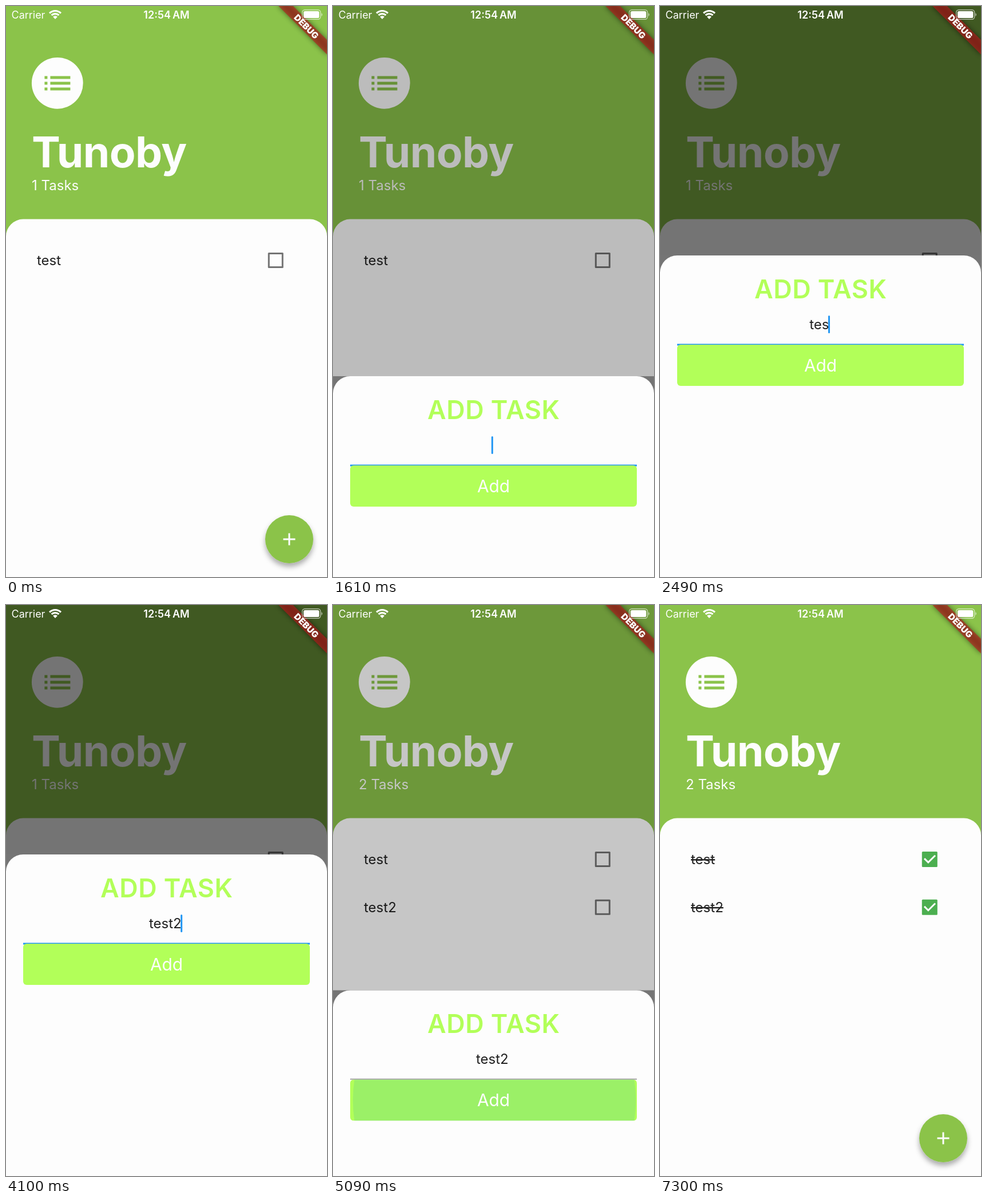
Recreate the animation shown at these times as an HTML page. Size 561 by 998 pixels, loop 7670 ms.

```html
<!DOCTYPE html>
<html lang="en">
<head>
<meta charset="utf-8">
<title>Task list</title>
<style>
  html, body { margin: 0; width: 100%; height: 100%; overflow: hidden; background: #8bc34a; }
  svg { display: block; width: 100vw; height: 100vh; }
  text { font-family: Inter, "Open Sans", sans-serif; font-size: 24px; white-space: pre; }
  .light { fill: #fdfdfd; }
  .dark { fill: #202020; }
  .mid { text-anchor: middle; }
</style>
</head>
<body>
<svg viewBox="0 0 561 998" preserveAspectRatio="none">
  <defs>
    <filter id="lift" x="-30%" y="-30%" width="160%" height="170%">
      <feDropShadow dx="0" dy="6" stdDeviation="5" flood-color="#000" flood-opacity=".33"/>
    </filter>
    <filter id="soft" x="-30%" y="-100%" width="160%" height="300%">
      <feGaussianBlur stdDeviation="5"/>
    </filter>
    <clipPath id="buttonShape"><rect x="30" y="156" width="501" height="72" rx="6"/></clipPath>
  </defs>

  <rect width="561" height="998" fill="#8bc34a"/>
  <circle cx="89.8" cy="134.8" r="44.9" class="light"/>
  <path fill="#8bc34a" d="M67.4 122.4h5v5h-5zm10 0h35v5h-35zM67.4 132.4h5v5h-5zm10 0h35v5h-35zM67.4 142.4h5v5h-5zm10 0h35v5h-35z"/>
  <text x="45" y="281.5" class="light" style="font-size:74.8px;font-weight:700;letter-spacing:-.6px">Tunoby</text>
  <text id="count" x="45" y="322" class="light"></text>

  <path class="light" d="M0 998V402.6a30 30 0 0 1 30-30H531a30 30 0 0 1 30 30V998z"/>
  <g id="rows"></g>
  <circle cx="495" cy="932" r="42" fill="#8bc34a" filter="url(#lift)"/>
  <path d="M484.5 932h21M495 921.5v21" stroke="#fdfdfd" stroke-width="3"/>

  <rect id="scrim" width="561" height="998"/>

  <g id="sheet">
    <rect width="561" height="562" fill="#757575"/>
    <path class="light" d="M0 562V30A30 30 0 0 1 30 0H531a30 30 0 0 1 30 30V562z"/>
    <text x="280.8" y="75" class="mid" fill="#b2ff59" style="font-size:44.9px;font-weight:600;letter-spacing:.5px">ADD TASK</text>
    <text id="entry" x="278.3" y="129" class="mid dark"></text>
    <rect id="caret" y="105" width="3" height="31" rx="1.5" fill="#2196f3"/>
    <rect id="underline" x="30" y="154.5" width="501"/>
    <g clip-path="url(#buttonShape)">
      <rect x="30" y="156" width="501" height="72" fill="#b2ff59"/>
      <circle id="splash" cx="282" cy="192" fill="#4ab89a"/>
    </g>
    <text x="280.5" y="203" class="mid light" style="font-size:29.9px">Add</text>
  </g>

  <g transform="translate(561 0) rotate(45)">
    <rect x="-60" y="41.9" width="120" height="18" opacity=".5" filter="url(#soft)"/>
    <rect x="-60" y="41.9" width="120" height="18" fill="#b71c1c" opacity=".63"/>
    <text y="56.4" class="mid" fill="#fff" style="font-size:15.3px;font-weight:900">DEBUG</text>
  </g>

  <g fill="#fff">
    <text x="9.5" y="22" style="font-size:18px">Carrier</text>
    <text x="280.5" y="22" class="mid" style="font-size:18px;font-weight:600;word-spacing:-1.5px">12:54 AM</text>
    <path d="M86 23l-4-4.2a5.8 5.8 0 0 1 8 0z"/>
    <path d="M79.6 16.2a9.1 9.1 0 0 1 12.8 0M76.1 12.6a14 14 0 0 1 19.8 0" fill="none" stroke="#fff" stroke-width="3.2"/>
    <rect x="517.7" y="6.7" width="32" height="16.6" rx="4.5" fill="none" stroke="#fff" stroke-width="1.4" opacity=".6"/>
    <rect x="520" y="9" width="27.4" height="12" rx="2.6"/>
    <path d="M551.3 12.3a3.2 3.2 0 0 1 0 5.6z" opacity=".6"/>
  </g>
</svg>

<script>
const LOOP = 7670;
const OPEN = 1540, SUBMIT = 4941, CLOSED = 5141;
const SHEET_TOP = 436, STAGE_HEIGHT = 998;
const KEYS = [[2210, "t"], [2350, "e"], [2430, "s"], [2510, "t"], [3740, "2"]];
const TASKS = [
  { name: "test", y: 444.5, checkedAt: 6060 },
  { name: "test2", y: 528.3, checkedAt: 6680 },
];

const el = id => document.getElementById(id);
const set = (node, attrs) => {
  for (const key in attrs) node.setAttribute(key, attrs[key]);
};
const progress = (t, start, length) => Math.min(1, Math.max(0, (t - start) / length));
const mix = (a, b, p) => a + (b - a) * p;

function bezier(x1, y1, x2, y2) {
  const at = (a, b, s) => 3 * a * s * (1 - s) ** 2 + 3 * b * s * s * (1 - s) + s ** 3;
  return x => {
    let low = 0, high = 1;
    for (let i = 0; i < 24; i++) {
      const s = (low + high) / 2;
      if (at(x1, x2, s) < x) low = s; else high = s;
    }
    return at(y1, y2, (low + high) / 2);
  };
}
const ease = bezier(.25, .1, .25, 1);
const easeOut = bezier(0, 0, .58, 1);
const easeIn = bezier(.42, 0, 1, 1);
const decelerate = bezier(0, 0, .2, 1);

for (const task of TASKS) {
  const row = document.createElementNS("http://www.w3.org/2000/svg", "g");
  row.innerHTML = `<text x="54" y="8.5" class="dark">${task.name}</text>
    <rect x="457.8" y="-13.5" width="27" height="27" rx="1.5"/>
    <rect class="light"/>
    <path d="M462 -1.4L468.8 5.4L481 -6.8" fill="none" stroke="#fdfdfd" stroke-width="3"
      pathLength="1" stroke-dasharray="1 2"/>`;
  set(row, { transform: `translate(0 ${task.y})` });
  el("rows").append(row);
  task.row = row;
  [task.label, task.box, task.hole, task.tick] = row.children;
}

function drawTask(task, t) {
  const p = easeIn(progress(t, task.checkedAt, 200));
  const fill = Math.min(1, p * 2), tick = Math.max(0, p * 2 - 1);
  const half = mix(10.5, 0, fill);
  const rgb = [[116, 76], [116, 175], [116, 80]].map(([a, b]) => Math.round(mix(a, b, fill)));
  task.label.style.textDecoration = t >= task.checkedAt ? "line-through" : "none";
  set(task.box, { fill: `rgb(${rgb})` });
  set(task.hole, { x: 471.3 - half, y: -half, width: half * 2, height: half * 2 });
  set(task.tick, { "stroke-dashoffset": 1 - tick, visibility: tick ? "visible" : "hidden" });
}

// The caret stays solid for 650 ms after a key, then fades out and in each second.
function caretOpacity(idle) {
  if (idle < 650) return 1;
  const phase = (idle - 650) % 1000;
  return phase < 500 ? 1 - easeOut(progress(phase, 0, 250)) : easeOut(progress(phase, 500, 250));
}

function drawSheet(t) {
  const shown = t < SUBMIT ? progress(t, OPEN, 250) : 1 - progress(t, SUBMIT, CLOSED - SUBMIT);
  set(el("scrim"), { opacity: .54 * ease(shown) });
  el("sheet").style.display = shown > 0 ? "" : "none";
  if (!shown) return;

  const top = STAGE_HEIGHT - (STAGE_HEIGHT - SHEET_TOP) * decelerate(shown);
  set(el("sheet"), { transform: `translate(0 ${top})` });

  const typed = KEYS.filter(([time]) => time <= t);
  const lastKey = typed.length ? typed[typed.length - 1][0] : OPEN + 20;
  const focused = t < SUBMIT;
  const entry = el("entry");
  entry.textContent = typed.map(key => key[1]).join("");
  const width = typed.length ? entry.getComputedTextLength() : 0;
  set(el("caret"), {
    x: 276.8 + width / 2,
    opacity: focused ? caretOpacity(t - lastKey) : 0,
  });
  set(el("underline"), { height: focused ? 3 : 1.5, fill: focused ? "#2196f3" : "#8c8c8c" });

  const pressed = progress(t, SUBMIT - 100, 100), released = progress(t, SUBMIT, 152);
  set(el("splash"), {
    r: mix(40 * pressed, 250, released),
    opacity: .36 * (1 - .55 * progress(t, SUBMIT, 200)),
  });
}

function draw(t) {
  const added = t >= SUBMIT;
  el("count").textContent = `${added ? 2 : 1} Tasks`;
  TASKS[1].row.style.display = added ? "" : "none";
  TASKS.forEach(task => drawTask(task, t));
  drawSheet(t);
}

const began = performance.now();
function tick() {
  draw((performance.now() - began) % LOOP);
  requestAnimationFrame(tick);
}
tick();
</script>
</body>
</html>
```
